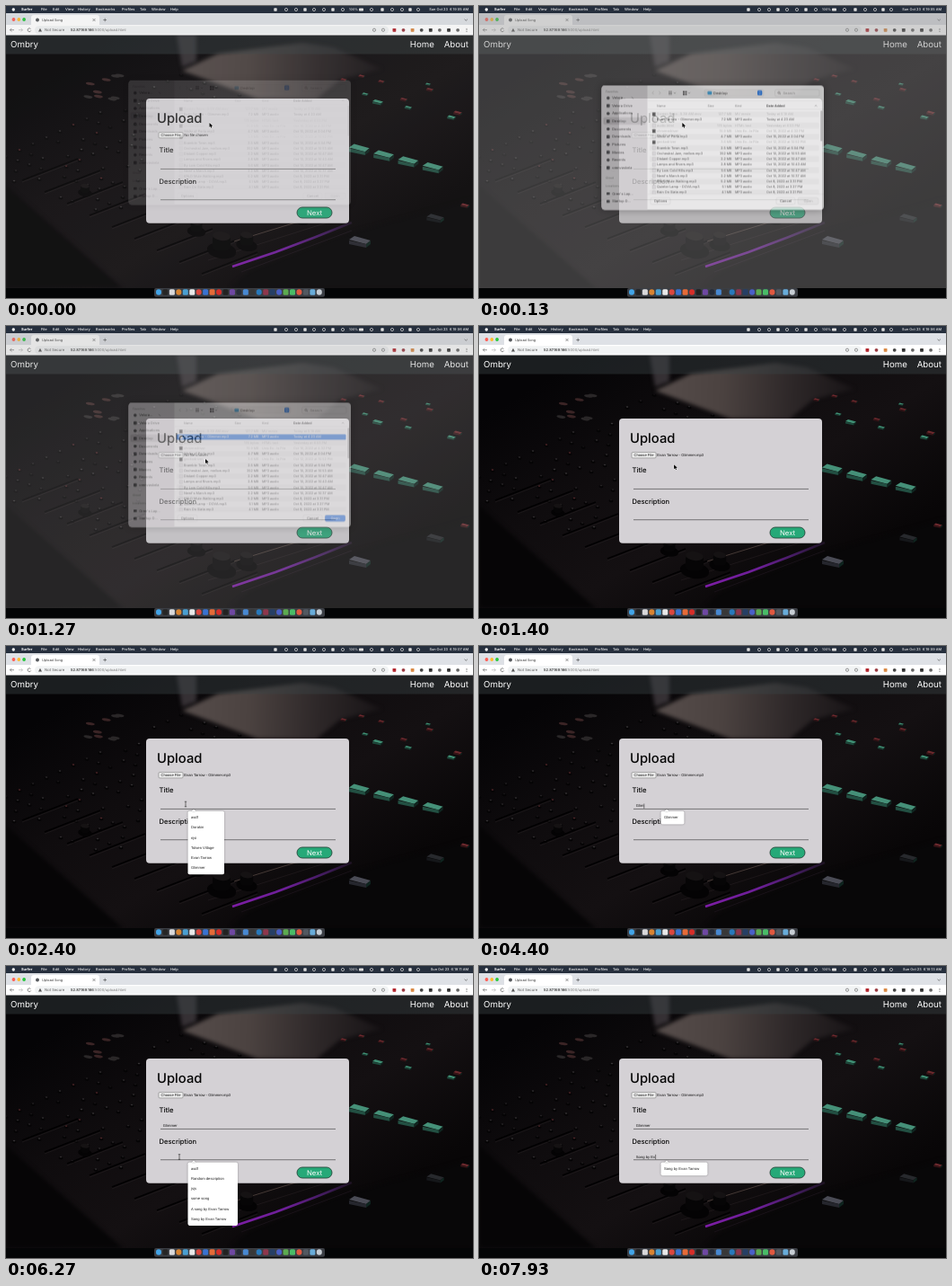
An HTML page with a canvas for the animation above (8000 ms loop, 520 px wide and 325 px high).

```html
<!DOCTYPE html>
<html lang="en">
<head>
<meta charset="utf-8">
<title>Upload Song</title>
<style>
html, body { margin: 0; width: 100%; height: 100%; overflow: hidden; background: #000; }
canvas { display: block; width: 100vw; height: 100vh; }
</style>
</head>
<body>
<canvas></canvas>
<script>
const canvas = document.querySelector('canvas');
const screen2d = canvas.getContext('2d');
let g = screen2d;
const UI = 'Inter, sans-serif', FORM = '"Liberation Sans", Arial, sans-serif';
const LOOP = 8000, ARTIST = 'Evan Tarrow', SONG = 'Glimmer', FILE = `${ARTIST} - ${SONG}.mp3`;
const clamp = v => Math.max(0, Math.min(1, v));

// ---- drawing helpers ----
function text(str, x, y, size = 4, color = '#222', weight = 400, family = UI, align = 'left') {
  g.font = `${weight} ${size}px ${family}`;
  g.textRendering = 'geometricPrecision';
  g.textAlign = align;
  g.textBaseline = 'middle';
  g.fillStyle = color;
  g.fillText(str, x, y);
}
function box(x, y, w, h, color, r = 0, stroke, width = 0.5) {
  g.beginPath();
  g.roundRect(x, y, w, h, r);
  g.fillStyle = color;
  g.fill();
  if (stroke) { g.strokeStyle = stroke; g.lineWidth = width; g.stroke(); }
}
function oval(x, y, rx, ry, color) {
  g.beginPath();
  g.ellipse(x, y, rx, ry, 0.15, 0, 7);
  g.fillStyle = color;
  g.fill();
}
const dot = (x, y, r, color) => oval(x, y, r, r, color);
function ring(x, y, r, color, width = 0.6, from = 0, to = 6.3) {
  g.beginPath();
  g.arc(x, y, r, from, to);
  g.strokeStyle = color;
  g.lineWidth = width;
  g.stroke();
}
function line(points, color, width = 0.6) {
  g.beginPath();
  points.forEach(p => g.lineTo(...p));
  g.strokeStyle = color;
  g.lineWidth = width;
  g.stroke();
}
function poly(points, color) {
  g.beginPath();
  points.forEach(p => g.lineTo(...p));
  g.fillStyle = color;
  g.fill();
}
function gradient(x0, y0, x1, y1, stops) {
  const fill = g.createLinearGradient(x0, y0, x1, y1);
  stops.forEach(([at, color]) => fill.addColorStop(at, color));
  return fill;
}
function withShadow(blur, color, draw) {
  g.save();
  g.shadowBlur = blur * canvas.width / 520;
  g.shadowColor = color;
  draw();
  g.restore();
}
// Runs a drawing routine on its own canvas of the same size as the stage.
function layer(draw) {
  const sheet = document.createElement('canvas');
  sheet.width = canvas.width;
  sheet.height = canvas.height;
  g = sheet.getContext('2d');
  g.scale(canvas.width / 520, canvas.height / 325);
  draw();
  g = screen2d;
  return sheet;
}

// ---- dark mixing desk behind the form ----
function deskKey(x, y, s, top, front) {
  poly([[x - 12 * s, y - 2 * s], [x - 6 * s, y - 6 * s], [x + 12 * s, y - 1 * s], [x + 7 * s, y + 3 * s]], top);
  poly([[x - 12 * s, y - 1 * s], [x + 7 * s, y + 3 * s], [x + 7 * s, y + 7 * s], [x - 12 * s, y + 3 * s]], front);
  poly([[x + 7 * s, y + 3 * s], [x + 12 * s, y - 1 * s], [x + 12 * s, y + 3 * s], [x + 7 * s, y + 7 * s]], '#0f241f');
}
function knob(x, y, s) {
  oval(x, y + 5 * s, 13 * s, 7 * s, '#040304');
  box(x - 8 * s, y - 9 * s, 16 * s, 14 * s, '#060506', 4 * s);
  oval(x, y - 8 * s, 8 * s, 4 * s, '#151213');
}
function desk() {
  g.beginPath();
  g.rect(0, 32, 520, 282);
  g.clip();
  g.fillStyle = gradient(120, 32, 300, 330, [[0, '#050406'], [0.35, '#0f0c0e'], [0.65, '#141012'], [1, '#080607']]);
  g.fillRect(0, 32, 520, 282);

  g.filter = `blur(${2 * canvas.width / 520}px)`;
  poly([[0, 200], [130, 314], [0, 314]], '#060506');
  poly([[375, 255], [520, 215], [520, 314], [250, 314], [270, 296]], '#080708');
  poly([[190, 32], [212, 32], [212, 62], [196, 68]], '#353034');
  const sheen = gradient(195, 60, 415, 70, [[0, '#564d4b'], [0.35, '#4b4240'], [0.7, '#2d2728'], [1, '#191517']]);
  poly([[196, 72], [236, 53], [330, 41], [365, 46], [418, 70], [372, 82], [345, 104], [280, 103]], sheen);

  g.filter = `blur(${0.6 * canvas.width / 520}px)`;
  let seed = 11;
  const random = () => (seed = seed * 16807 % 2147483647) / 2147483647;
  for (let j = 0; j < 16; j++) for (let i = 0; i < 12; i++) {
    const x = 195 + i * 13 - j * 15, y = 76 + i * 4.5 + j * 7;
    const shade = 18 + random() * 36, lit = random();
    if (x < 0 || lit < 0.35) continue;
    oval(x, y + 1.2, 2.4, 1.5, '#050405');
    oval(x, y, 1.3, 0.8, lit > 0.93 ? '#4d2528' : `rgb(${shade},${shade - 3},${shade - 1})`);
  }
  for (let i = 0; i < 9; i++) oval(78 + random() * 55, 76 + random() * 28, 5, 1.6, i % 2 ? '#3a2425' : '#2a2728');
  for (let i = 0; i < 9; i++) {
    const x = 18 + i * 25, y = 182 + i * 13;
    line([[x, y + 12], [x + 62, y - 12]], '#020102', 1.8);
    line([[x, y + 14], [x + 62, y - 10]], '#252123', 0.6);
  }
  line([[254, 262], [365, 228]], '#4c3f3a', 0.9);
  line([[225, 283], [380, 234]], '#211b1d', 0.8);

  for (let i = 0; i < 5; i++) deskKey(366 + i * 27.3, 152.5 + i * 6.8, 0.95, '#459078', '#224f42');
  [[414, 107, 0.5], [400, 98, 0.3], [448, 113, 0.35], [470, 87, 0.25], [496, 124, 0.4]]
    .forEach(([x, y, s]) => deskKey(x, y, s, '#3f8f74', '#1d4a3c'));
  [[443, 104, 0.35], [472, 93, 0.35], [503, 119, 0.4], [376, 82, 0.3], [396, 78, 0.3], [418, 84, 0.3], [511, 222, 0.4]]
    .forEach(([x, y, s]) => deskKey(x, y, s, '#6c292d', '#3a1518'));
  deskKey(394, 262, 1, '#4a4b55', '#25262d');
  deskKey(478, 236, 0.8, '#27292d', '#15171a');

  const glow = gradient(252, 0, 385, 0, [[0, '#7d1da5'], [0.45, '#6c1f97'], [0.8, '#3d1b57'], [1, '#1c1220']]);
  line([[252, 290], [300, 274], [345, 257], [385, 241]], glow, 2.8);
  line([[262, 296], [385, 250]], '#1d161d', 0.8);
  knob(240, 266, 1.25);
  knob(212, 247, 0.8);
  knob(268, 262, 0.9);
  knob(330, 238, 0.5);
  knob(88, 205, 0.6);
  g.filter = 'none';
  box(0, 32, 520, 21.5, 'rgba(58,68,70,.42)');
}

// ---- desktop and browser ----
function menuBar(t) {
  box(0, 0, 520, 8, '#262f3d');
  dot(8.3, 4, 1.7, '#eee');
  text('Surfer', 17, 4, 4, '#fff', 700);
  [['File', 39], ['Edit', 52], ['View', 66], ['History', 80], ['Bookmarks', 100], ['Profiles', 129],
    ['Tab', 149], ['Window', 162], ['Help', 183]].forEach(([s, x]) => text(s, x, 4, 4, '#f2f2f2', 500));
  [300, 312, 323, 333, 343, 354, 364, 375, 407, 419, 430, 441, 450, 459].forEach((x, i) =>
    i % 3 ? ring(x, 4, 1.6, '#ddd', 0.7) : box(x - 1.7, 2.3, 3.4, 3.4, '#ddd', 0.6));
  text('100%', 382, 4, 3.7, '#eee', 500);
  box(393, 2.6, 5, 2.8, '#ddd', 0.7);
  const second = 6 + Math.floor((t - 530) / 1000);
  text(`Sun Oct 23  6:19:${String(second).padStart(2, '0')} AM`, 515, 4, 3.9, '#f2f2f2', 500, UI, 'right');
}
function browser() {
  box(0, 8, 520, 13, '#dee1e6');
  ['#ff5f57', '#febc2e', '#28c840'].forEach((c, i) => dot(8.5 + i * 5.8, 15, 1.9, c));
  box(28, 10, 76, 12, '#fff', [3, 3, 0, 0]);
  dot(35, 15.5, 2, '#55585c');
  text('Upload Song', 40, 15.6, 3.8, '#333');
  line([[96.5, 14], [99.5, 17]], '#555');
  line([[99.5, 14], [96.5, 17]], '#555');
  line([[108.3, 15.5], [112, 15.5]], '#444');
  line([[110.2, 13.6], [110.2, 17.4]], '#444');
  line([[510.5, 14.7], [512.2, 16.3], [513.9, 14.7]], '#444');
  box(0, 21, 520, 11.5, '#fff');
  box(32, 22.2, 394, 9, '#f1f3f4', 4.5);
  line([[9, 26.7], [4.5, 26.7], [6.3, 24.9]], '#555');
  line([[4.5, 26.7], [6.3, 28.5]], '#555');
  line([[14, 26.7], [18.5, 26.7], [16.7, 24.9]], '#aaa');
  line([[18.5, 26.7], [16.7, 28.5]], '#aaa');
  ring(26, 26.7, 1.9, '#555', 0.7, 0.4, 5.6);
  poly([[36, 28.4], [38, 24.8], [40, 28.4]], '#555');
  text('Not Secure', 43, 26.8, 4.2, '#555');
  const host = '52.87.169.166';
  text(host, 72, 26.8, 4.1, '#222', 500);
  text(':5000/upload.html', 72 + g.measureText(host).width, 26.8, 4.1, '#777');
  ring(410, 26.7, 1.6, '#555');
  ring(420, 26.7, 1.6, '#555');
  ['#b3262e', '#9b3b42', '#d98a45', '#454545', '#333', '#666', '#333', '#666'].forEach((c, i) =>
    box(430.5 + i * 10.1, 24.9, 3.8, 3.8, c, i % 2 ? 1.9 : 0.7));
  [25.2, 26.8, 28.4].forEach(y => dot(513, y, 0.5, '#444'));
}
function dock() {
  box(0, 314, 520, 11, '#040506');
  box(165, 314, 190, 9.7, '#3b3e44', 2);
  ['#43a5e8', '#252525', '#d8d8da', '#d88331', '#4a9fd0', '#e9e9e9', '#db473e', '#3972d0', '#e66b38', '#d62e2a',
    '#222', '#6e48a2', '#272c38', '#4888d1', '#383838', '#2879bb', '#8e364c', '#263f65', '#4a5fc8', '#5cab50',
    '#49bb67', '#e05840', '#525860', '#68acd9', '#c6cdd3'].forEach((c, i) =>
    box(167 + i * 7.45, 315.3, 6, 6.4, c, i % 3 ? 1.5 : 3));
}

// ---- upload form ----
function field(value, x, y, caret) {
  text(value, x, y, 4.2, '#111', 400, FORM);
  if (caret) {
    const end = x + g.measureText(value).width + 0.4;
    line([[end, y - 2.7], [end, y + 2.7]], '#111', 0.5);
  }
}
function suggestions(items, y, w) {
  withShadow(2, '#0006', () => {
    box(202.5, y, w, items.length * 11.15 + 3.5, '#fff', 1.8);
    poly([[206.5, y + 0.2], [209, y - 2], [211.5, y + 0.2]], '#fff');
  });
  items.forEach((s, i) => text(s, 206, y + 7.4 + i * 11.15, 4.15, '#222', 400, FORM));
}
const latest = (steps, t) => steps.filter(s => t >= s[0]).pop();
const blink = (t, since) => (t - since) % 1060 < 530;

const titleSteps = [[1850, ''], [3270, SONG.slice(0, 1)], [3530, SONG.slice(0, 2)], [3800, SONG.slice(0, 3)],
  [4070, SONG.slice(0, 4)], [4600, SONG]];
const sentence = `Song by ${ARTIST}`;
const noteSteps = [5470, 6800, 6930, 7070, 7200, 7270, 7470, 7540, 7600, 7870, 7930]
  .map((at, n) => [at, sentence.slice(0, n && n + (n > 8 ? 0 : 0))]);
const titleHints = ['asdf', 'Dorakin', 'njsi', 'Tolsen Village', ARTIST, SONG];
const noteHints = ['asdf', 'Random description', 'jsjs', 'some song', `A song by ${ARTIST}`, sentence];
const matching = (hints, typed) => hints.filter(s => s.toLowerCase().startsWith(typed.toLowerCase()));

function page(t) {
  text('Ombry', 5, 43, 9.7, '#fff', 400);
  text('Home', 477, 43, 9.7, '#fff', 400, UI, 'right');
  text('About', 515, 43, 9.7, '#fff', 400, UI, 'right');
  box(156, 103, 226, 138.7, '#d4d1d5', 4);
  text('Upload', 168, 125.5, 14.8, '#050505', 500);
  box(170, 140.6, 27, 6.3, '#efefef', 1, '#666', 0.5);
  text('Choose File', 183.5, 143.9, 4.1, '#111', 400, FORM, 'center');
  text(t < 1400 ? 'No file chosen' : FILE, 198.3, 143.8, 4.2, '#111', 400, FORM);
  text('Title', 170.5, 161, 7.7, '#050505', 500);
  text('Description', 170.5, 195.6, 7.6, '#050505', 500);
  line([[172, 181.4], [367, 181.4]], '#333');
  line([[172, 215.7], [367, 215.7]], '#333');
  box(324, 224, 39, 12, '#26a978', 6, '#25483b', 0.9);
  text('Next', 343.5, 230.2, 7.8, '#fff', 400, UI, 'center');

  const title = latest(titleSteps, t), note = latest(noteSteps, t);
  if (title) field(title[1], 174.8, 178.2, !note && blink(t, title[0]));
  if (note) field(note[1], 174.8, 212.5, blink(t, note[0]));
  if (t >= 2070 && t < 4600) {
    const hints = matching(titleHints, title[1]);
    suggestions(hints, 183.8, hints.length > 1 ? 40.5 : 26);
  }
  if (t >= 5530) {
    const hints = matching(noteHints, note[1]);
    suggestions(hints, 218.5, hints.length > 1 ? 55.5 : 52);
  }
}

// ---- file chooser ----
const files = [
  ['Screen Reco...5.39 AM.mov', '127.7 MB', 'MV movie', 'Today at 5:19 AM', 1],
  [FILE, '7.2 MB', 'MP3 audio', 'Today at 4:23 AM'],
  ['audio.html', '176 bytes', 'HTML text', 'Yesterday at 6:53 PM', 1],
  ['chromedriver', '15.9 MB', 'Unix Ex...le File', 'Oct 16, 2022 at 4:32 PM', 1],
  ['Waltz of Perla.mp3', '4.7 MB', 'MP3 audio', 'Oct 15, 2022 at 2:04 PM'],
  ['geckodriver', '3.6 MB', 'Unix Ex...le File', 'Oct 12, 2022 at 10:52 PM', 1],
  ['Bramble Town.mp3', '2.5 MB', 'MP3 audio', 'Oct 10, 2022 at 5:04 PM'],
  ['Orchestral Jam, mellow.mp3', '352 MB', 'MP3 audio', 'Oct 10, 2022 at 10:53 AM'],
  ['Distant Copper.mp3', '2.2 MB', 'MP3 audio', 'Oct 10, 2022 at 10:47 AM'],
  ['Lamps and Rivers.mp3', '2.8 MB', 'MP3 audio', 'Oct 10, 2022 at 10:43 AM'],
  ['By Low Cold Hills.mp3', '5.6 MB', 'MP3 audio', 'Oct 10, 2022 at 10:47 AM'],
  ["Newt's March.mp3", '2.2 MB', 'MP3 audio', 'Oct 10, 2022 at 10:37 AM'],
  ['KRLD Mule Walking.mp3', '5.2 MB', 'MP3 audio', 'Oct 8, 2022 at 3:31 PM'],
  ['Quieter Lamp - DOVA.mp3', '5.1 MB', 'MP3 audio', 'Oct 8, 2022 at 3:27 PM'],
  ['Rain On Slate.mp3', '4.1 MB', 'MP3 audio', 'Oct 8, 2022 at 3:21 PM']];
const places = ['Velora...', 'Velora Drive', 'Applications', 'Desktop', 'Documents', 'Downloads', 'Pictures', 'Movies',
  'Recents', 'orenvaskela'];

function chooser(t) {
  withShadow(9, '#0008', () => box(136.5, 92, 247.5, 138.5, '#fff', 4));
  box(136.5, 92, 51, 138.5, '#dddadd', [4, 0, 0, 4]);
  text('Favorites', 141, 99, 3.2, '#888', 500);
  box(138.5, 127.6, 47, 8, '#bfbcc0', 1.5);
  places.forEach((s, i) => {
    const y = 106 + i * 8.62;
    box(142, y - 1.8, 3.6, 3.6, '#47474b', i % 2 ? 0.6 : 1.8);
    text(s, 148.3, y, 3.9, '#252525');
  });
  line([[170, 104.8], [172, 106.8]], '#555', 0.5);
  text('Cloud', 141, 195.5, 3.2, '#888', 500);
  text('Locations', 141, 204.5, 3.2, '#888', 500);
  ["Oren's Lap...", 'Startup D...'].forEach((s, i) => {
    box(142, 211 + i * 8.6, 3.6, 2.8, '#47474b', 0.5);
    text(s, 148.3, 212.4 + i * 8.6, 3.9, '#252525');
  });

  line([[194.5, 98.5], [193, 100.3], [194.5, 102]], '#bbb', 0.5);
  line([[200.5, 98.5], [202, 100.3], [200.5, 102]], '#bbb', 0.5);
  [98.8, 100.3, 101.8].forEach(y => line([[211, y], [215, y]], '#555', 0.6));
  [227, 229.5].forEach(x => [98.3, 100.8].forEach(y => box(x, y, 1.9, 1.9, '#555')));
  [218, 234].forEach(x => line([[x - 1, 99.8], [x, 100.8], [x + 1, 99.8]], '#555', 0.5));
  box(251, 96.6, 66, 7.6, '#f7f7f7', 1.8, '#e2e2e2', 0.4);
  box(254.5, 98.6, 4.8, 3.7, '#39a6e3', 0.7);
  text('Desktop', 261, 100.5, 4, '#222');
  box(310, 97.6, 5.3, 5.5, '#1673ed', 1.3);
  line([[311.6, 99.9], [312.6, 98.8], [313.6, 99.9]], '#fff', 0.5);
  line([[311.6, 100.9], [312.6, 102], [313.6, 100.9]], '#fff', 0.5);
  box(329.5, 96.6, 49.5, 7.6, '#fff', 1.8, '#ddd', 0.5);
  ring(334, 100.1, 1.2, '#666', 0.5);
  line([[334.9, 101], [336, 102.1]], '#666', 0.5);
  text('Search', 338.5, 100.5, 4, '#999');
  line([[187.5, 109], [384, 109]], '#e2e2e2', 0.4);
  [['Name', 198], ['Size', 254.5], ['Kind', 285]].forEach(([s, x]) => text(s, x, 114.6, 3.5, '#666'));
  text('Date Added', 320, 114.6, 3.6, '#222', 700);
  line([[374, 115.2], [375.2, 114], [376.4, 115.2]], '#555', 0.5);
  line([[187.5, 118.5], [384, 118.5]], '#e2e2e2', 0.4);

  g.save();
  g.beginPath();
  g.rect(187.5, 118, 196.5, 95);
  g.clip();
  files.forEach(([name, size, kind, date, disabled], i) => {
    const y = 124.1 + i * 6.23, chosen = i === 1 && t >= 860;
    if (i % 2 === 0) box(190, y - 3.1, 188.5, 6.2, '#f5f5f5', 1);
    if (chosen) box(190, y - 3.1, 188.5, 6.2, '#1266dc', 1);
    const color = chosen ? '#fff' : disabled ? '#b5b5b5' : '#333';
    box(193, y - 2, 3.6, 4, i === 0 || kind.startsWith('Unix') ? '#333' : '#e5e3e6', 0.4, '#aaa', 0.3);
    text(name, 198, y, 3.8, color);
    text(size, 281.5, y, 3.7, color, 400, UI, 'right');
    text(kind, 285, y, 3.7, color);
    text(date, 320, y, 3.7, color);
  });
  box(380.2, 120, 2.2, 34, '#bbb', 1.1);
  g.restore();
  line([[187.5, 213], [384, 213]], '#e0e0e0', 0.4);
  const button = (label, x, w, fill, color) => {
    box(x, 217, w, 7.4, fill, 1.8, '#d5d5d5', 0.4);
    text(label, x + w / 2, 220.8, 4, color, 400, UI, 'center');
  };
  button('Options', 191, 22, '#fff', '#222');
  button('Cancel', 331, 21, '#fff', '#222');
  if (t >= 930) button('Open', 355, 23, '#1268e8', '#fff');
  else button('Open', 355, 23, '#f5f5f5', '#aaa');
}

// ---- pointer ----
const path = [[0, 226.5, 130], [800, 224.5, 129], [1150, 224.5, 129], [1270, 222, 148], [1700, 200, 176],
  [4870, 200, 176], [5400, 193, 212.5], [LOOP, 193, 212.5]];
function pointer(t) {
  if ((t >= 3270 && t < 4870) || t >= 6800) return;
  const i = path.findIndex(p => p[0] > t), [t0, x0, y0] = path[i - 1], [t1, x1, y1] = path[i];
  const k = (t - t0) / (t1 - t0), e = k * k * (3 - 2 * k);
  const x = x0 + (x1 - x0) * e, y = y0 + (y1 - y0) * e;
  const overField = t > 1340 && ((y > 172 && y < 181.4) || (y > 206 && y < 215.7));
  if (overField) {
    line([[x, y - 2.8], [x, y + 2.8]], '#222', 0.6);
    [-2.8, 2.8].forEach(d => line([[x - 1.2, y + d], [x + 1.2, y + d]], '#222', 0.6));
    return;
  }
  const arrow = [[0, 0], [0, 5], [1.2, 4], [2, 5.8], [2.9, 5.4], [2.1, 3.7], [3.7, 3.6], [0, 0]]
    .map(([dx, dy]) => [x + dx, y + dy]);
  line(arrow, '#fff', 0.9);
  poly(arrow, '#000');
}

let backdrop;
function frame(now) {
  const t = now % LOOP;
  const w = Math.round(innerWidth * devicePixelRatio), h = Math.round(innerHeight * devicePixelRatio);
  if (!backdrop || canvas.width !== w || canvas.height !== h) {
    canvas.width = w;
    canvas.height = h;
    backdrop = layer(desk);
  }
  g.setTransform(w / 520, 0, 0, h / 325, 0, 0);
  g.drawImage(backdrop, 0, 0, 520, 325);
  browser();
  page(t);
  const shown = t < 1170 ? clamp(0.15 + t / 250) : clamp(1 - (t - 1170) / 167);
  if (shown > 0) {
    box(0, 8, 520, 306, `rgba(140,140,140,${0.6 * shown})`);
    const sheet = layer(() => chooser(t));
    g.globalAlpha = shown;
    g.drawImage(sheet, 0, -11 * (1 - shown), 520, 325);
    g.globalAlpha = 1;
  }
  menuBar(t);
  dock();
  pointer(t);
  requestAnimationFrame(frame);
}
requestAnimationFrame(frame);
</script>
</body>
</html>
```
